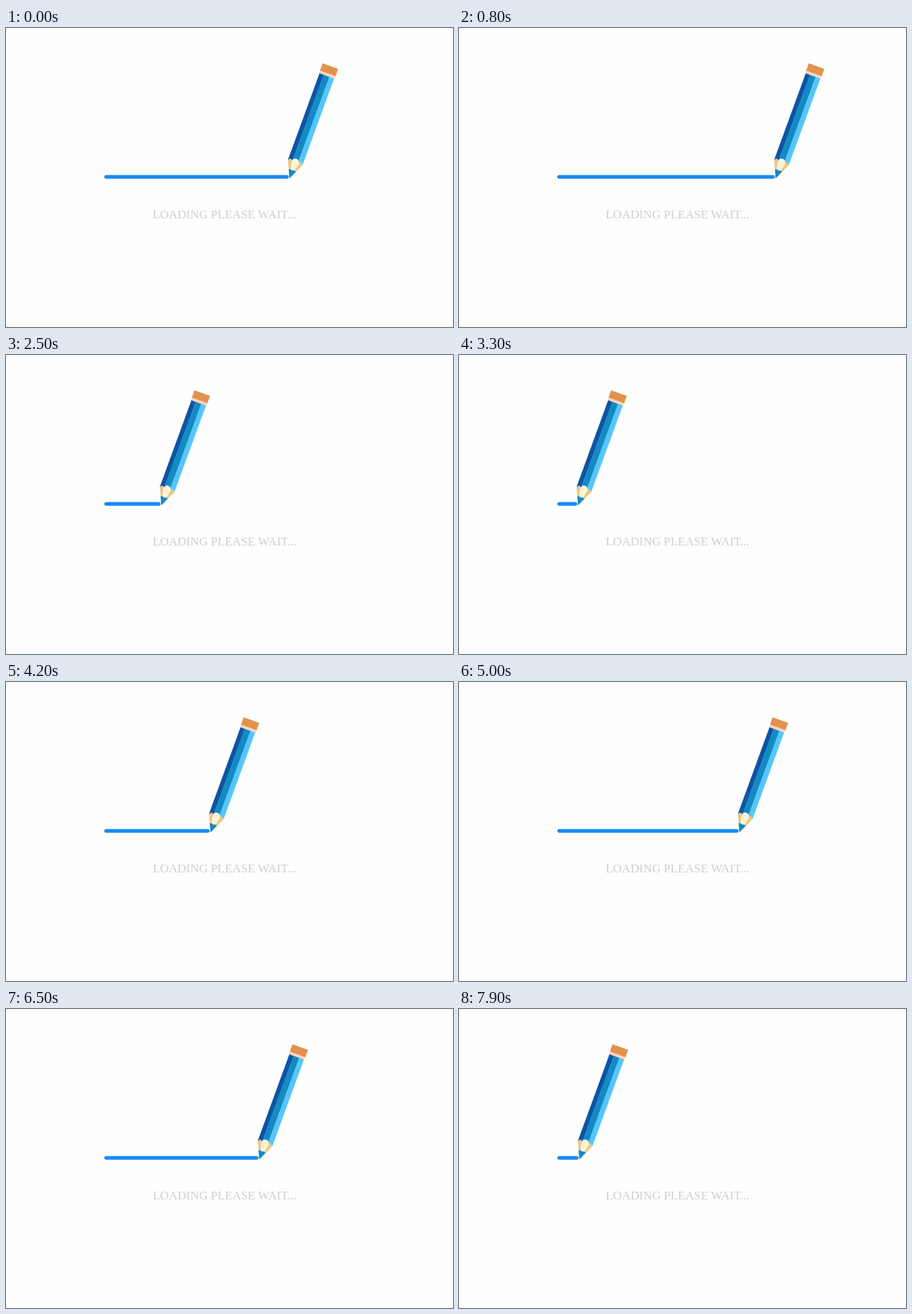
An HTML page that plays this animation: 632 px wide and 424 px high, repeating every 8000 ms.

```html
<!DOCTYPE html>
<html lang="en">
<head>
<meta charset="utf-8">
<title>Loading</title>
<style>
  html, body { margin: 0; width: 100%; height: 100%; overflow: hidden; background: #fefefe; }
  svg { display: block; width: 632px; height: 424px; }
  text { font: 17.1px "Liberation Serif", "Times New Roman", serif; fill: #cecece; }
</style>
</head>
<body>
<svg viewBox="0 0 632 424">
  <rect id="line" x="139" y="208.4" height="5.4" rx="2.7" fill="#178bf5"/>
  <!-- The pencil stands upright with its point at the group's zero -->
  <g id="pencil">
    <path d="M-11-24V-155H-4.5V-24z" fill="#0b55a5"/>
    <path d="M-4.7-24V-155H4V-24z" fill="#148ac3"/>
    <path d="M3.8-24V-155H11V-24z" fill="#55c6fa"/>
    <path d="M0 0L-11-24Q-7.8-29-4.7-25L4.5-25Q8-29 11-24z" fill="#efc583"/>
    <path d="M-2.5-10L-5.4-23Q-5-29.5 0-29.5Q5.2-29.5 5.4-23L2.5-10z" fill="#fdf3d8"/>
    <path d="M0 0L-5.3-11.6Q-2.6-13.6 0-11.6Q2.6-13.6 5.3-11.6z" fill="#148ac3"/>
    <rect x="-11.6" y="-158.7" width="23.2" height="4.2" fill="#f7d3bf"/>
    <rect x="-11.7" y="-169.3" width="23.4" height="10.8" fill="#e2924b"/>
  </g>
  <text x="207.4" y="270">LOADING PLEASE WAIT...</text>
</svg>
<script>
  const LOOP = 8000, STEP = 100;
  const LEFT = 139.6, RIGHT = 477.2;
  const SWEEP = 2516, FIRST_TURN = 575;
  const line = document.getElementById("line");
  const pencil = document.getElementById("pencil");

  // Constant speed between both ends, turning right at FIRST_TURN
  function tipAt(ms) {
    const phase = (ms - FIRST_TURN + 2 * SWEEP) % (2 * SWEEP);
    return LEFT + (RIGHT - LEFT) * Math.abs(1 - phase / SWEEP);
  }

  function draw(now) {
    const ms = Math.floor((now % LOOP) / STEP) * STEP;
    const tip = tipAt(ms);
    line.setAttribute("width", Math.max(0, tip - 139.4));
    pencil.setAttribute("transform", `translate(${tip + 0.7} 213.2) rotate(20)`);
    requestAnimationFrame(draw);
  }

  draw(0);
</script>
</body>
</html>
```
